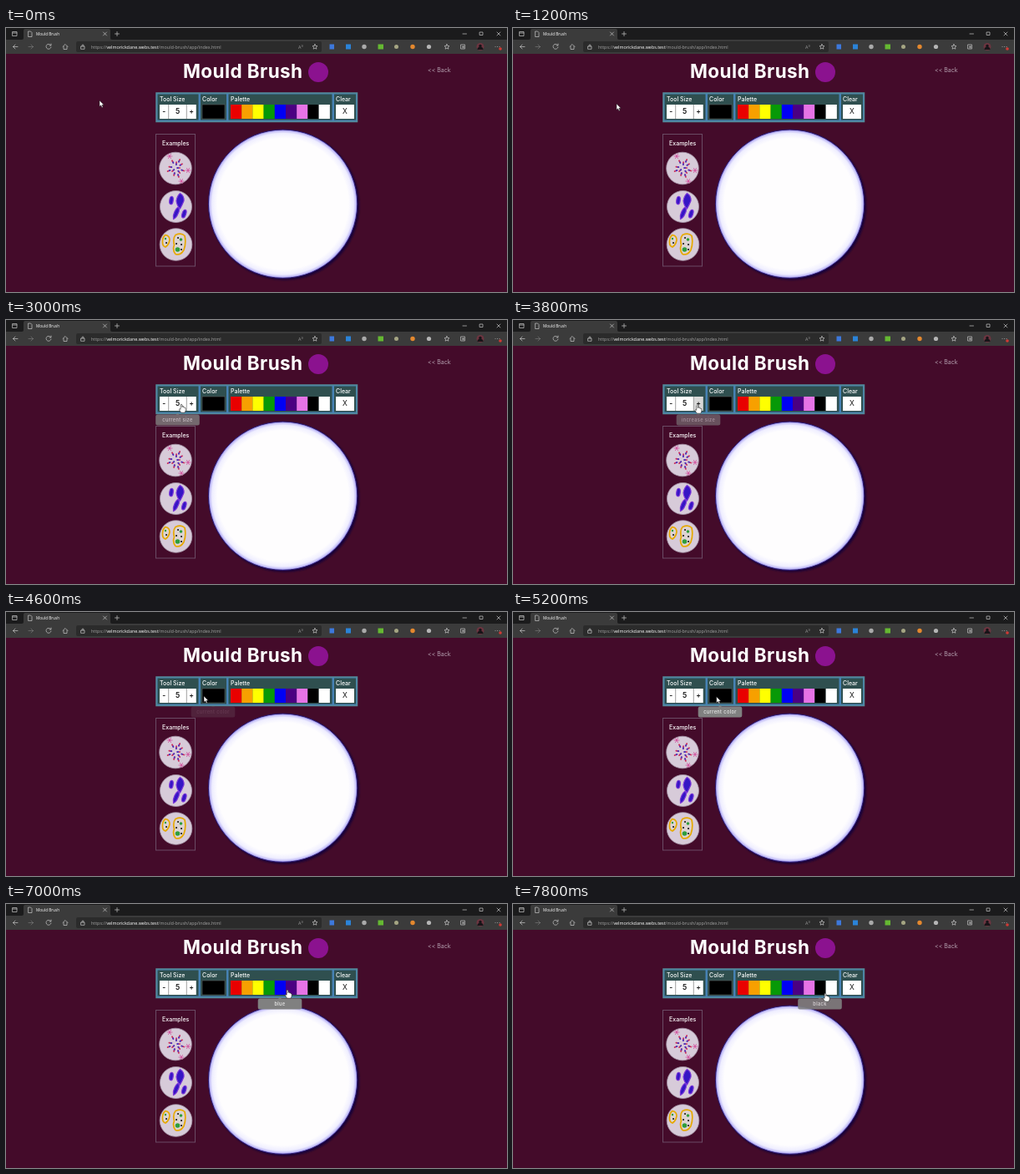
An HTML page for the animation above (8 s loop, 600 px wide and 317 px high).

```html
<!DOCTYPE html>
<html lang="en">
<head>
<meta charset="utf-8">
<title>Mould Brush</title>
<style>
  html, body { margin: 0; height: 100%; overflow: hidden; background: #440b2a; }
  svg { display: block; width: 100vw; height: 100vh; }
  text { font: 500 7px Inter, sans-serif; fill: #fff; }
  .mid { text-anchor: middle; }
  .ui text { font: 5.4px "Open Sans", sans-serif; }
  .line { fill: none; stroke: #c8c8c8; stroke-width: .7; stroke-linecap: round; stroke-linejoin: round; }
  .key text { font-size: 8.5px; font-weight: 600; fill: #111; }
  #title { font-size: 22.5px; font-weight: 700; letter-spacing: .4px; }
  #tip text { font-size: 5.6px; letter-spacing: .4px; fill: #eee; }
</style>
</head>
<body>
<svg viewBox="0 0 600 317" preserveAspectRatio="none">
  <defs>
    <radialGradient id="glass">
      <stop offset=".88" stop-color="#fefdfe"/>
      <stop offset=".95" stop-color="#efeeff"/>
      <stop offset=".98" stop-color="#c6c1f8"/>
      <stop offset="1" stop-color="#7469d0"/>
    </radialGradient>
    <filter id="blur"><feGaussianBlur stdDeviation="1.2"/></filter>
  </defs>
  <rect width="600" height="317" fill="#440b2a"/>

  <g class="ui">
    <rect width="600" height="16" fill="#1b1b1c"/>
    <path d="M0 14H19Q21 14 21 12V3Q21 1 23 1H123Q125 1 125 3V12Q125 14 127 14H600V31H0Z" fill="#3b3b3b"/>
    <rect x="84" y="16" width="294" height="13" rx="2" fill="#2b2b2b"/>
    <text x="36" y="9" style="font-size:4.7px">Mould Brush</text>
    <text x="102" y="24.500" style="fill:#a4a4a4">https://<tspan fill="#fff">velmorickdane.webs.test</tspan>/mould-brush/app/index.html</text>
    <text x="350" y="24.500" style="fill:#999">A<tspan dy="-1.5" font-size="4">))</tspan></text>
    <g class="line">
      <path d="M8 4.500h5v5h-5zM8 6h5M27 4h2.500l1.500 1.500v5h-4zM116.500 5l4 4m0-4l-4 4M133 4.500v5m-2.500-2.500h5"/>
      <path d="M547 7h4.500M567.500 5h3.500v3.500h-3.500zM588 5l4 4m0-4l-4 4"/>
      <path d="M14 22.500H8.500m2.500-2.500l-2.500 2.500 2.500 2.500M53.500 20.500a3 3 0 1 0 .5 2.500m0-4v2h-2M68 22.500l3-3 3 3M69 22v3.500h4V22"/>
      <path d="M27 22.500h5.500m-2.500-2.500l2.500 2.500-2.500 2.500" opacity=".4"/>
      <path d="M90 22h4v3.300h-4zM91 22v-1a1 1 0 0 1 2 0v1"/>
      <path id="star" d="M370 19.500l.9 2 2.100.2-1.600 1.400.5 2.100-1.900-1.100-1.900 1.100.5-2.100-1.600-1.400 2.100-.2z"/>
      <use href="#star" x="158"/>
      <path d="M545 20h4.500v5h-4.500zM547.500 21.500v2.500m-1.200-1.200h2.500"/>
    </g>
    <rect x="387.500" y="19.500" width="5.500" height="6" fill="#3d78dc"/>
    <rect x="407" y="19.500" width="6" height="6" fill="#2b83d8"/>
    <circle cx="429" cy="22.500" r="2.700" fill="#aaa"/>
    <rect x="445.500" y="19.500" width="6.500" height="6" fill="#65b832"/>
    <circle cx="467.500" cy="22.500" r="2.500" fill="#a5a583"/>
    <circle cx="487" cy="22.500" r="2.700" fill="#e4882e"/>
    <circle cx="506.500" cy="22.500" r="2.600" fill="#b5b5b5"/>
    <circle cx="568" cy="22.500" r="4.500" fill="#6c3540"/>
    <path d="M564.500 26a3.500 3.500 0 0 1 7 0z" fill="#181418"/><circle cx="568" cy="21.500" r="1.700" fill="#181418"/>
    <path d="M586 22.500h.1m2.400 0h.1m2.400 0h.1" class="line"/>
    <circle cx="592" cy="25" r="1.800" fill="#d33a35"/>
  </g>

  <text id="title" x="212" y="60">Mould Brush</text>
  <circle cx="374" cy="53" r="12" fill="#8b128f"/>
  <text x="505" y="52.500" style="fill:#b5a2b0;font-weight:400">&lt;&lt; Back</text>

  <rect x="180" y="78" width="240.500" height="34.500" fill="#4682b4" stroke="#548a98" stroke-width="1.500"/>
  <path d="M181.500 79.500h49v31h-49zM233 79.500h31v31h-31zM266.500 79.500h124v31h-124zM393 79.500h26v31h-26z" fill="#2f4f4f"/>
  <text x="184" y="88">Tool Size</text><text x="235" y="88">Color</text>
  <text x="269" y="88">Palette</text><text x="395" y="88">Clear</text>
  <g class="key mid">
    <path d="M184 92h43.500v17h-43.500zM395 92h22v17h-22z" fill="#fff"/>
    <rect id="minus" x="184" y="92" width="10.500" height="17"/>
    <rect id="plus" x="216.500" y="92" width="11" height="17"/>
    <path d="M194.700 92v17M216.300 92v17" stroke="#777" stroke-width=".7"/>
    <text x="189.200" y="103">-</text><text x="205.500" y="103.300">5</text>
    <text x="222" y="103">+</text><text x="405.800" y="103.300" style="font-weight:400">X</text>
  </g>
  <rect x="235" y="92" width="27" height="17" stroke="#555" stroke-width=".6"/>
  <g id="palette"></g>

  <rect x="179.500" y="127.500" width="47" height="158.500" fill="none" stroke="#6a4b64"/>
  <text class="mid" x="203.200" y="141">Examples</text>
  <g fill="#d7cbd9" stroke="#a797aa" stroke-width=".8">
    <circle cx="203" cy="168.500" r="19.300"/><circle cx="203.500" cy="214.500" r="19"/><circle cx="203.500" cy="260" r="19.300"/>
  </g>
  <g id="germs" stroke-linecap="round"></g>
  <g fill="#3516c4" stroke="#7a35d8" stroke-width="1.200">
    <path d="M208.500 198.500q5 3 4.500 9-2 5-4.500 9.500-4-4-4.500-9.500 1-6 4.500-9z"/>
    <path d="M206.500 215q2 4-.5 8-2 5-5.500 6.500-1-4 1-8 2-5 5-6.500z"/>
    <ellipse cx="198" cy="207" rx="2.200" ry="4.800" transform="rotate(8 198 207)"/>
    <ellipse cx="213.300" cy="223" rx="2.300" ry="5" transform="rotate(18 213 223)"/>
  </g>
  <g fill="#ddd3d2" stroke="#e6a800" stroke-width="1.700">
    <path d="M191 248.500q5 1 5 6-1 6-5 8.500-4-1-3.500-7 0-5 3.500-7.500zM203 248.500q7-3 11 1 2 9-1 17-4 7-10 5-4-5-1.500-11-2-8 1.500-12z"/>
  </g>
  <g fill="#2f9d3c">
    <circle cx="205.500" cy="266" r="2.800"/><circle cx="209.500" cy="254" r="1.800"/><circle cx="191" cy="253" r="1.200"/>
  </g>
  <path d="M204 259h.1M210 260h.1M206 252h.1M210 266h.1M192 258h.1" stroke="#191919" stroke-width="2" stroke-linecap="round"/>

  <circle cx="333.500" cy="213" r="89.500" fill="#170638" filter="url(#blur)"/>
  <circle cx="331.600" cy="211.200" r="89.200" fill="url(#glass)" stroke="#2a186c" stroke-width="1"/>

  <g id="tip" class="mid">
    <path d="M-2 114L0 111.500 2 114z" fill="#808080"/>
    <rect x="-26.300" y="113.500" width="52.600" rx="2.500" fill="#808080"/>
    <text y="122"></text><text y="130"></text>
  </g>
  <path id="arrow" d="M0 0V7.300L1.700 5.800 2.900 8.400 4.100 7.900 3 5.300H5.200Z" fill="#fff" stroke="#222" stroke-width=".5"/>
  <path id="hand" d="M-.9.800Q0-.8.9.800V3.700Q2-.0 2.600 3.900 3.900 3.200 4 4.500 5.300 4 5.200 5.600V7.300Q5 9 4 10.200H-.3Q-1.800 8.300-2.700 6.300-2.600 5-.9 6.300Z" fill="#fff" stroke="#222" stroke-width=".6"/>
</svg>
<script>
const $ = id => document.getElementById(id);
const LOOP = 8000, STEP = 200, FADE = 500;

const swatches = ['#e90000', '#f7a000', '#ffff00', '#079907', '#0000f5', '#4b0082', '#e673e6', '#000', '#fff'];
const swatchX = i => 269 + i * 13.2;
$('palette').innerHTML = swatches.map((color, i) =>
  `<rect x="${swatchX(i)}" y="92" width="13.250" height="17" fill="${color}"/>`).join('');

// Red rods with blue tips around a centre, plus three pink bursts
const stroke = (x, y, angle, length, color, width) =>
  `<path d="M${x} ${y}l${Math.cos(angle) * length} ${Math.sin(angle) * length}" stroke="${color}" stroke-width="${width}"/>`;
let germs = '';
for (let i = 0; i < 12; i++) {
  const angle = i * 2.4, r = 2.5 * Math.sqrt(i + .5);
  const x = 203.5 + r * Math.cos(angle), y = 168 + r * Math.sin(angle);
  germs += stroke(x, y, angle, 3, '#cc2a58', 1.7) + stroke(x, y, angle, .8, '#4537c4', 1.8);
}
for (const [x, y] of [[196, 154], [218, 171], [210, 184]])
  for (let i = 0; i < 6; i++) germs += stroke(x, y, i * Math.PI / 3, 3, '#d44d9c', .8);
$('germs').innerHTML = germs;

// time, x, y of the pointer
const path = [
  [0, 112, 87], [1000, 112, 87], [1200, 124, 91], [1600, 184, 101], [2000, 190, 102], [2400, 194, 102],
  [3000, 210, 101], [3400, 214, 101], [3600, 220, 102], [4200, 222, 102], [4400, 230, 101],
  [4600, 237, 101], [5400, 246, 102], [5600, 254, 102], [5800, 275, 103], [6000, 291, 103],
  [6400, 316, 103], [6600, 325, 103], [7000, 337, 103], [7400, 361, 105], [7800, 374, 107], [8000, 374, 107]
];
// label, centre, start, end
const tips = [
  ['decrease|size', 189, 1650, 2500], ['current size', 205.5, 2600, 3500], ['increase size', 222, 3500, 4350],
  ['current color', 248, 4500, 5600], ['orange', 288.5, 5700, 6150], ['yellow', 302, 6150, 6350],
  ['green', 315, 6350, 6450], ['blue', 328, 6450, 7100], ['indigo', 341.5, 7100, 7250],
  ['violet', 354.5, 7250, 7350], ['black', 367.5, 7350, 8000]
];

function pointerAt(t) {
  const i = path.findIndex(p => p[0] > t);
  const [t0, x0, y0] = path[i - 1], [t1, x1, y1] = path[i];
  const k = (t - t0) / (t1 - t0);
  return [x0 + (x1 - x0) * k, y0 + (y1 - y0) * k];
}

function drawTip(t) {
  const tip = tips.find(([, , start, end]) => t >= start && t < end);
  $('tip').style.opacity = tip ? Math.min(1, (t - tip[2]) / FADE) : 0;
  if (!tip) return;
  const lines = tip[0].split('|');
  $('tip').setAttribute('transform', `translate(${tip[1]})`);
  $('tip').querySelector('rect').setAttribute('height', lines.length > 1 ? 21 : 13);
  $('tip').querySelectorAll('text').forEach((el, i) => el.textContent = lines[i] || '');
}

function draw(now) {
  const t = Math.floor(now % LOOP / STEP) * STEP;
  const [x, y] = pointerAt(t);
  const onMinus = x >= 184 && x < 194.5, onPlus = x >= 216.5 && x < 228;
  const isHand = x >= 184 && x < 228 || x >= 269;
  for (const [id, shown] of [['hand', isHand], ['arrow', !isHand]]) {
    $(id).setAttribute('transform', `translate(${x} ${y})`);
    $(id).style.display = shown ? '' : 'none';
  }
  $('minus').style.fill = onMinus ? '#d8d8d8' : '#fff';
  $('plus').style.fill = onPlus ? '#d8d8d8' : '#fff';
  drawTip(t);
  requestAnimationFrame(() => draw(performance.now()));
}
draw(performance.now());
</script>
</body>
</html>
```
